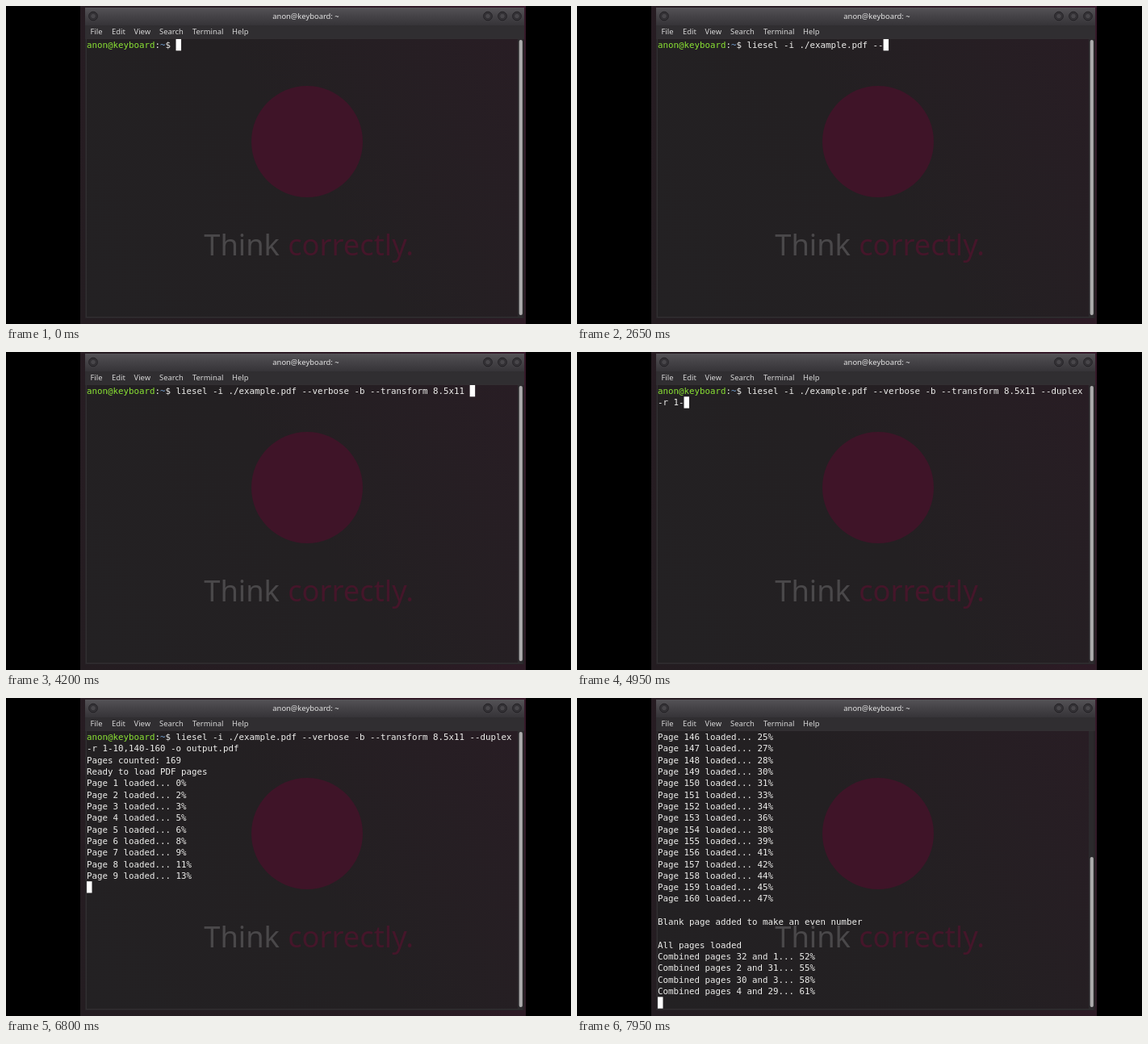
Recreate the animation shown at these times as an HTML page with a canvas. Size 700 by 394 pixels, loop 8000 ms.

```html
<!DOCTYPE html>
<html lang="en">
<head>
<meta charset="utf-8">
<title>Terminal demo</title>
<style>
html, body { margin: 0; width: 100%; height: 100%; overflow: hidden; background: #000; }
canvas { display: block; width: 700px; height: 394px; }
</style>
</head>
<body>
<canvas id="stage" width="700" height="394"></canvas>
<script>
const ctx = document.getElementById('stage').getContext('2d');
const LOOP = 8000, COLS = 82, ROWS = 24;
const LEFT = 100, TOP = 41, CELL = 6.502, LINE = 14.32;
const MONO = '10.8px "DejaVu Sans Mono", monospace';
const UI = '9.4px "Noto Sans", sans-serif';
const HOST = 'anon@keyboard';
const PROMPT = HOST + ':~$ ';
const COMMAND = 'liesel -i ./example.pdf --verbose -b --transform 8.5x11 ' +
  '--duplex -r 1-10,140-160 -o output.pdf';
const ENTER = 6250;

// Time and number of characters typed by then
const KEYS = [[1400, 0], [1450, 1], [2250, 18], [3050, 34], [3100, 34], [3950, 51],
  [4200, 56], [4250, 56], [4300, 57], [4800, 67], [5650, 84], [5700, 84],
  [5750, 85], [5900, 88], [6200, 94]];

const log = buildLog();

function buildLog() {
  const out = [[6300, 'Pages counted: 169'], [6350, 'Ready to load PDF pages']];
  for (let k = 1; k <= 31; k++) {
    const page = k > 10 ? k + 129 : k;
    const time = k <= 9 ? 6350 + k * 50 : 6800 + (k - 9) * 47;
    out.push([time, `Page ${page} loaded... ${Math.round((k - 1) * 1.567)}%`]);
  }
  for (const text of ['', 'Blank page added to make an even number', '', 'All pages loaded'])
    out.push([7845, text]);
  for (let i = 0; i < 4; i++) {
    const pair = i % 2 ? [i + 1, 32 - i] : [32 - i, i + 1];
    out.push([7850 + i * 30, `Combined pages ${pair.join(' and ')}... ${52 + i * 3}%`]);
  }
  return out;
}

function typedAt(t) {
  if (t < KEYS[0][0]) return 0;
  // Typing shows up in pairs here
  if (t >= 2300 && t < 3050) return t < 2350 ? 19 : 18 + 2 * Math.floor((t - 2250) / 100);
  for (let i = 1; i < KEYS.length; i++) {
    const [t0, n0] = KEYS[i - 1], [t1, n1] = KEYS[i];
    if (t < t1) return Math.floor(n0 + (n1 - n0) * (t - t0) / (t1 - t0) + 1e-6);
  }
  return COMMAND.length;
}

function cursorOn(t) {
  if (t < 1400) return t < 200 || t >= 800;
  return t < ENTER || Math.floor((t - ENTER) / 600) % 2 === 0;
}

function rect(x, y, w, h, fill) {
  ctx.fillStyle = fill;
  ctx.fillRect(x, y, w, h);
}

function label(text, x, y, font, fill, align = 'left') {
  ctx.font = font;
  ctx.fillStyle = fill;
  ctx.textAlign = align;
  ctx.fillText(text, x, y);
}

function shade(x0, y0, x1, y1, ...colors) {
  const g = ctx.createLinearGradient(x0, y0, x1, y1);
  colors.forEach((c, i) => g.addColorStop(i / (colors.length - 1), c));
  return g;
}

function disc(x, y, r, fill, stroke) {
  ctx.beginPath();
  ctx.arc(x, y, r, 0, Math.PI * 2);
  ctx.fillStyle = fill;
  ctx.fill();
  if (stroke) {
    ctx.strokeStyle = stroke;
    ctx.lineWidth = 1;
    ctx.stroke();
  }
}

function drawWindow() {
  rect(0, 0, 700, 394, '#000');
  rect(92, 0, 552, 394, shade(92, 394, 644, 0, '#241d21', '#281c23', '#37192a'));
  rect(98, 2, 544, 385, '#282528');
  rect(98, 2, 544, 22, shade(0, 2, 0, 24, '#545256', '#444246', '#363438'));
  rect(98, 24, 544, 17, '#302e31');
  rect(99, 40, 541, 346, '#322f32');
  rect(100, 41, 539, 344, shade(100, 385, 639, 41, '#232123', '#232022', '#281d24'));
  rect(634, 41, 6, 344, '#2b292c');

  for (const x of [108, 597, 615, 633]) {
    disc(x, 12.5, 5.3, '#3a383c', '#1f1d21');
    disc(x, 12.5, 3.4, '#48464a', '#2c2a2e');
  }
  label(HOST + ': ~', 371.5, 16, UI, '#e4e4e4', 'center');
  const menu = { File: 104.5, Edit: 131, View: 158.5, Search: 190, Terminal: 231, Help: 280 };
  for (const name in menu) label(name, menu[name], 35, UI, '#d6d6d6');

  disc(373, 168, 69, '#3f1428');
  const big = '36.3px "Noto Sans", sans-serif';
  label('Think', 245.2, 309, big, '#4a484a');
  label('correctly.', 349.2, 309, big, '#45162a');
}

function drawPrompt(y) {
  const parts = [[HOST, 0, '#8ae234'], [':', 13, '#eeeeec'], ['~', 14, '#729fcf'], ['$', 15, '#eeeeec']];
  for (const [text, col, fill] of parts) label(text, LEFT + col * CELL, y, MONO, fill);
}

function drawTerminal(t) {
  const line = PROMPT + COMMAND.slice(0, typedAt(t));
  const lines = [];
  for (let i = 0; i <= line.length; i += COLS) lines.push(line.slice(i, i + COLS));
  let col = line.length % COLS;
  if (t >= ENTER) {
    for (const [time, text] of log) if (t >= time) lines.push(text);
    lines.push('');
    col = 0;
  }
  const first = Math.max(0, lines.length - ROWS);

  lines.slice(first).forEach((text, row) => {
    const y = TOP + 11 + row * LINE;
    if (first + row === 0) {
      drawPrompt(y);
      label(text.slice(PROMPT.length), LEFT + PROMPT.length * CELL, y, MONO, '#eeeeec');
    } else {
      label(text, LEFT, y, MONO, '#eeeeec');
    }
  });

  if (cursorOn(t)) {
    const row = lines.length - 1 - first;
    rect(LEFT + col * CELL, TOP + row * LINE, CELL, LINE, '#fff');
  }

  const bar = 341 * Math.min(1, ROWS / lines.length);
  ctx.beginPath();
  ctx.roundRect(635.7, 383 - bar, 4.2, bar, 2);
  ctx.fillStyle = '#acabac';
  ctx.fill();
}

const start = performance.now();
function frame() {
  const t = (performance.now() - start) % LOOP;
  drawWindow();
  drawTerminal(t);
  requestAnimationFrame(frame);
}
frame();
</script>
</body>
</html>
```
